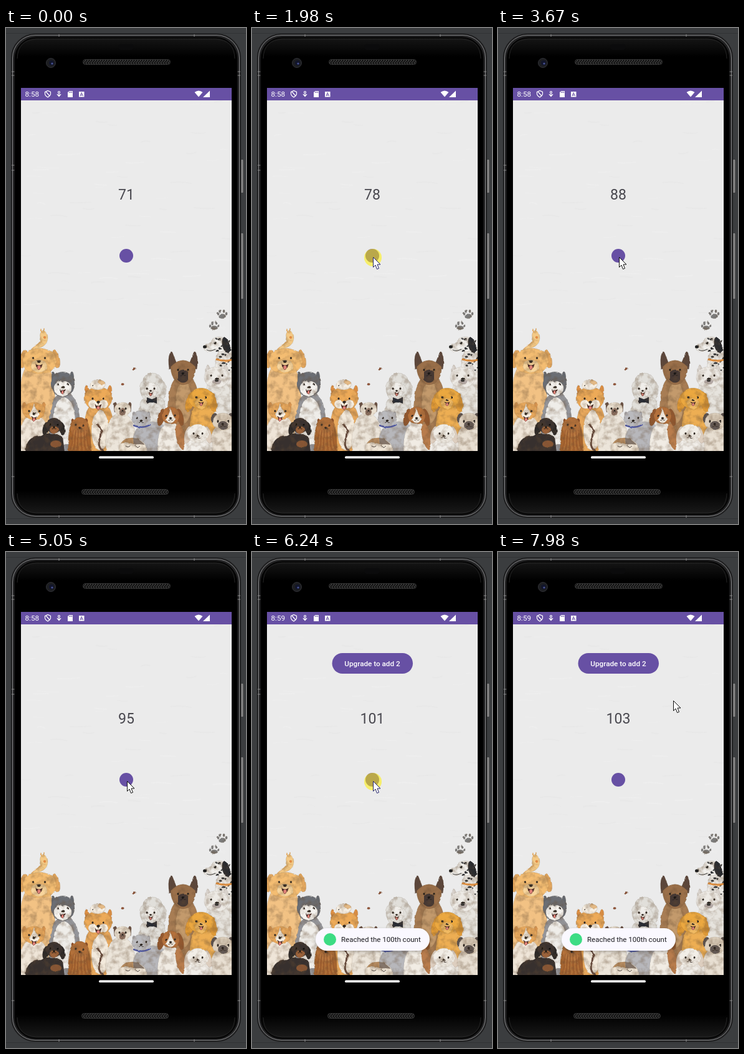
These frames come from a looping animation (385x795 px, 8 s). An HTML page:

```html
<!DOCTYPE html>
<html lang="en">
<head>
<meta charset="utf-8">
<title>Tap counter</title>
<style>
html, body { margin: 0; width: 100%; height: 100%; overflow: hidden; background: #3b3d3f; }
svg { display: block; width: 385px; height: 795px; font-family: Roboto, sans-serif; }
text { white-space: pre; }
</style>
</head>
<body>
<svg viewBox="0 0 385 795" xmlns="http://www.w3.org/2000/svg">
  <defs>
    <linearGradient id="glass" x2="0" y2="1">
      <stop offset="0" stop-color="#161616"/><stop offset=".04" stop-color="#000"/>
      <stop offset=".95" stop-color="#000"/><stop offset="1" stop-color="#1a1a1a"/>
    </linearGradient>
    <linearGradient id="key" x2="1"><stop stop-color="#444"/><stop offset=".5" stop-color="#999"/><stop offset="1" stop-color="#4a4a4a"/></linearGradient>
    <pattern id="mesh" width="4" height="8" patternUnits="userSpaceOnUse">
      <rect width="4" height="8" fill="#171717"/><path d="M0 0L4 4L0 8" fill="none" stroke="#484848"/>
    </pattern>
    <clipPath id="screen"><rect x="24" y="96" width="338" height="582"/></clipPath>
    <filter id="soft" x="-20%" y="-40%" width="140%" height="200%"><feGaussianBlur stdDeviation="2.5"/></filter>
    <!-- ragged fur edges and mottled watercolour tone -->
    <filter id="wash" filterUnits="userSpaceOnUse" x="20" y="445" width="346" height="240" color-interpolation-filters="sRGB">
      <feTurbulence type="fractalNoise" baseFrequency=".1" numOctaves="3" seed="4" result="noise"/>
      <feDisplacementMap in="SourceGraphic" in2="noise" scale="3" xChannelSelector="R" yChannelSelector="G" result="rough"/>
      <feColorMatrix in="noise" values="0 0 0 0 .4  0 0 0 0 .3  0 0 0 0 .2  0 .9 0 0 -.37"/>
      <feComposite operator="in" in2="rough" result="tone"/>
      <feMerge><feMergeNode in="rough"/><feMergeNode in="tone"/></feMerge>
    </filter>
  </defs>

  <rect width="385" height="795" fill="#3b3d3f"/>
  <path d="M0 8.5H385M0 786.5H385" stroke="#303234"/>
  <rect x="376.500" y="211" width="4.500" height="53" rx="1.5" fill="url(#key)"/>
  <rect x="376.500" y="329" width="4.500" height="105" rx="1.5" fill="url(#key)"/>
  <rect x="8.500" y="9.500" width="368" height="775" rx="38" fill="#232324" stroke="#1a1a1b"/>
  <rect x="10.500" y="11.500" width="364" height="771" rx="36.500" fill="none" stroke="#868789"/>
  <path d="M9 70H14M9 76H14M9 220H14M9 228H14M9 719H14M371 70H376M371 76H376M371 719H376M85 10V14M302 10V14M85 781V785M302 781V785" stroke="#8b8b8b"/>
  <rect x="14.500" y="15.500" width="356" height="764" rx="34" fill="url(#glass)" stroke="#050505" stroke-width="2"/>
  <path d="M18 49Q19 19 49 18H336Q366 19 367 49M18 746Q19 776 49 777H336Q366 776 367 746" fill="none" stroke="#242424"/>
  <rect x="180" y="26" width="25" height="9" rx="4.5" fill="#0b0b0c"/>
  <rect x="123.500" y="50.500" width="140" height="8" rx="4" fill="url(#mesh)" stroke="#343434"/>
  <rect x="121.500" y="739.500" width="139" height="8" rx="4" fill="url(#mesh)" stroke="#343434"/>
  <circle cx="72" cy="56" r="7.500" fill="#1d1e21" stroke="#303136"/>
  <circle cx="73" cy="56" r="4" fill="#12152a"/><circle cx="74" cy="57" r="1.600" fill="#4a5596"/>

  <g clip-path="url(#screen)">
    <rect x="24" y="96" width="338" height="582" fill="#ebebeb"/>
    <g id="paper" stroke-linecap="round"></g>
    <g id="pets" filter="url(#wash)" stroke="#5a4632" stroke-opacity=".16" stroke-width=".8"></g>
    <rect x="24" y="96" width="338" height="20" fill="#6750a4"/>
    <text id="clock" x="30.500" y="110" font-size="11.7" fill="#fff"></text>
    <g fill="none" stroke="#fff" stroke-width="1.2">
      <path d="M62.500 102.500L67 100.500L71.500 102.500V106Q71 109 67 111Q63 109 62.500 106ZM64 102L70 109"/>
      <circle cx="85" cy="103" r="1.5"/><path d="M82 106L85 109.500L88 106M85 105V110"/>
    </g>
    <g fill="#fff">
      <path d="M99 103L101.500 101H107V111H99Z"/><rect x="117" y="102" width="8.500" height="8.500"/>
      <path d="M302.500 103Q309 98 315.500 103L309 110.500Z"/><path d="M316 111L327 100.500V111Z"/>
    </g>
    <path d="M101.500 102V104M103.500 102V104M105.500 102V104M119 109L121.200 103.500L123.500 109M120 107.500H122.500" fill="none" stroke="#6750a4"/>

    <g id="button">
      <rect x="128.500" y="162" width="129.500" height="33" rx="16.500" fill="#6750a4"/>
      <text x="193" y="183" font-size="11.7" font-weight="500" fill="#fff" text-anchor="middle">Upgrade to add 2</text>
    </g>
    <text id="count" x="193" y="274.500" font-size="23" fill="#49484f" text-anchor="middle"></text>
    <circle cx="193" cy="365" r="11" fill="#6750a4"/>
    <g id="toast">
      <rect x="102" y="605" width="183" height="36" rx="18" fill="#000" opacity=".25" filter="url(#soft)"/>
      <rect x="102" y="603" width="183" height="36" rx="18" fill="#faf8ff"/>
      <circle cx="125" cy="621" r="10" fill="#3ddc84"/>
      <text x="143" y="625" font-size="11.5" fill="#1c1b20">Reached the 100th count</text>
    </g>
  </g>
  <rect x="149" y="686.300" width="88" height="3.700" rx="1.850" fill="#f2f2f2"/>

  <g id="cursor">
    <circle id="press" r="14" cy="1" fill="#fff000" opacity=".55"/>
    <path id="arrow" d="M.5 .5V16.500L4 13L6.500 19.500L9.500 18.300L7 12H12Z" fill="#fff" stroke-linejoin="round"/>
  </g>
</svg>
<script>
const $ = id => document.getElementById(id);
const LOOP = 8000;

function paintPaper() {
  let seed = 7;
  const rnd = () => (seed = seed * 16807 % 2147483647) / 2147483647;
  let out = '';
  for (let i = 0; i < 75; i++) {
    const x = 24 + rnd() * 338, y = 118 + rnd() * 400, w = 8 + rnd() * 28;
    out += `<path d="M${x} ${y}q${w / 2} ${rnd() * 6 - 3} ${w} ${rnd() * 4 - 2}" fill="none" stroke="${rnd() < .6 ? '#f0f0f0' : '#e6e6e6'}" stroke-width="${.6 + rnd() * 1.6}" opacity=".6"/>`;
  }
  $('paper').innerHTML = out;
}

function paintPets() {
  let out = '';
  const oval = (x, y, rx, ry, fill, turn = 0) =>
    out += `<ellipse cx="${x}" cy="${y}" rx="${rx}" ry="${ry}" fill="${fill}" transform="rotate(${turn} ${x} ${y})"/>`;
  const shape = (d, fill) => out += `<path d="${d}" fill="${fill}"/>`;
  const line = (d, color, width = 1) =>
    out += `<path d="${d}" fill="none" stroke="${color}" stroke-opacity="1" stroke-width="${width}" stroke-linecap="round"/>`;
  const body = (x, top, w, bottom, fill) =>
    shape(`M${x - w / 2} ${bottom}C${x - w * .55} ${top + 15} ${x - w * .35} ${top} ${x} ${top}S${x + w * .55} ${top + 15} ${x + w / 2} ${bottom}Z`, fill);
  const ears = (x, y, gap, h, fill, w = 7) => [-1, 1].forEach(s =>
    shape(`M${x + s * (gap - w)} ${y + 3}L${x + s * (gap - 1)} ${y - h + 2}Q${x + s * (gap + 1)} ${y - h - 1} ${x + s * (gap + 3)} ${y - h + 3}Q${x + s * (gap + w * .7)} ${y - h / 2} ${x + s * (gap + w * .4)} ${y + 8}Z`, fill));
  const flops = (x, y, gap, rx, ry, fill) => [-1, 1].forEach(s => oval(x + s * gap, y, rx, ry, fill, s * -14));
  const face = (x, y, gap, tongue, dark = '#29231f') => {
    oval(x - gap, y, 1.5, 1.7, dark);
    oval(x + gap, y, 1.5, 1.7, dark);
    oval(x, y + gap * .6, gap * .3, gap * .22, dark);
    if (tongue) {
      shape(`M${x - gap * .6} ${y + gap}Q${x} ${y + gap * 1.4} ${x + gap * .6} ${y + gap}Q${x} ${y + gap * 3} ${x - gap * .6} ${y + gap}Z`, '#4a2925');
      oval(x, y + gap * 1.6, gap * .27, gap * .36, '#e5847b');
    } else line(`M${x - gap * .5} ${y + gap * 1.1}Q${x - 1} ${y + gap * 1.3} ${x} ${y + gap * .7}Q${x + 1} ${y + gap * 1.3} ${x + gap * .5} ${y + gap * 1.1}`, dark, .8);
  };
  const paw = (x, y) => {
    oval(x, y + 3, 5.5, 3.8, '#7c7c7c');
    [[-6.5, -1], [-3, -5], [2.5, -5], [6.5, -1]].forEach(([dx, dy]) => oval(x + dx, y + dy, 1.7, 2.4, '#7c7c7c'));
  };

  paw(347, 459);
  paw(334, 478);
  oval(205, 547, 2.5, 1.7, '#935338');
  oval(187, 571, 2.5, 1.7, '#935338');

  // golden retriever and bird
  body(50, 535, 58, 650, '#f2c284');
  flops(54, 530, 26, 6, 15, '#e2a75f');
  shape('M27 532C27 507 80 507 80 532C81 550 68 554 54 554S27 550 27 532Z', '#f4bd72');
  oval(53, 542, 13, 10, '#f8d59c');
  face(53, 529, 9.5, true);
  shape('M40 515Q55 508 55 496Q53 488 60 484Q67 486 67 497Q66 514 40 515Z', '#f4c985');
  line('M42 514L57 502M58 488L55 483M61 487L61 482', '#e3aa62', 1.5);
  oval(62, 495, 2, 2, '#e88b42');

  // husky
  body(94, 585, 50, 680, '#94959a');
  oval(93, 630, 18, 38, '#efede9');
  ears(91, 562, 14, 12, '#64676d');
  oval(91, 571, 19, 20, '#6b6e74');
  shape('M91 568Q98 562 105 574Q107 587 91 591Q75 587 77 574Q84 562 91 568Z', '#f5f3ef');
  face(91, 571, 8, true);

  // shiba and hamster
  body(149, 600, 49, 680, '#e8a85c');
  oval(151, 645, 14, 32, '#f3eadc');
  ears(148, 585, 18, 13, '#df9145');
  oval(148, 594, 22, 19, '#edaa58');
  flops(148, 603, 8, 8, 7, '#fbf3e6');
  face(148, 594, 9, true);
  oval(147, 572, 13, 8, '#f6eee2');
  oval(153, 568, 6, 3, '#e4ba86', 15);
  oval(139, 573, 1, 1, '#333');

  // poodle
  body(235, 592, 48, 640, '#e4e2dd');
  [[224, 579, 9, 15], [249, 580, 8, 15], [235, 565, 15, 12], [235, 583, 14, 14], [224, 604, 9, 11], [246, 603, 9, 11]]
    .forEach(([x, y, rx, ry]) => oval(x, y, rx, ry, '#e1dfda'));
  oval(233, 580, 10, 12, '#f0eeea');
  face(232, 578, 6, true);
  shape('M226 592L234 595L242 592V602L234 599L226 602Z', '#282b33');

  // shepherd
  body(285, 557, 52, 660, '#a87d54');
  oval(285, 600, 13, 34, '#c39a6c');
  ears(284, 540, 18, 22, '#5b463b', 10);
  shape('M264 543Q284 522 304 543Q305 558 295 568Q284 576 273 568Q264 557 264 543Z', '#9b704a');
  shape('M276 551Q284 544 292 551L292 565Q284 572 276 565Z', '#443733');
  face(284, 548, 8, false, '#171514');

  // dalmatian
  body(354, 510, 38, 580, '#ece9e4');
  oval(342, 507, 14, 12, '#f1efeb');
  oval(328, 512, 11, 6.5, '#f1efeb', -6);
  oval(353, 508, 6, 13, '#292b2f', -12);
  oval(319, 511, 3, 2.5, '#1e2022');
  oval(336, 505, 1.7, 2, '#222');
  line('M322 516Q329 519 335 515', '#333');
  for (let i = 0; i < 24; i++) oval(338 + i * 37 % 25, 498 + i * 53 % 60, 1.5 + i % 2, 1.6, '#303236');
  line('M338 531Q350 535 362 532', '#df8f40', 3);

  // bulldog
  body(340, 564, 48, 640, '#e6e3dd');
  ears(338, 551, 14, 12, '#d8d2cc', 8);
  oval(338, 560, 20, 17, '#eeebe6');
  face(338, 557, 9, false);
  oval(338, 567, 7, 4, '#b7adab');
  oval(338, 565, 3, 2, '#333');

  // spaniel
  body(316, 600, 42, 660, '#edae53');
  flops(313, 599, 18, 6.5, 17, '#e09a36');
  oval(313, 594, 20, 17, '#eba840');
  oval(313, 602, 10, 9, '#f0b962');
  face(313, 592, 7, true);

  // corgi
  body(45, 620, 46, 678, '#efe5d8');
  ears(45, 610, 15, 11, '#dc9852');
  oval(45, 614, 18, 14, '#e8a85c');
  shape('M45 601Q47 612 53 619Q45 633 37 619Q43 612 45 601Z', '#fbf4e8');
  face(45, 614, 8, true);

  // siamese cat
  line('M146 636Q157 644 151 657T157 680', '#65493c', 3);
  body(184, 618, 47, 680, '#ece5da');
  ears(187, 608, 11, 9, '#6a5247', 5);
  oval(187, 611, 13, 11, '#ebe1d2');
  oval(187, 615, 5, 6, '#8c7061');
  face(187, 610, 5, false);

  // grey cat
  body(234, 631, 62, 682, '#b7b7bb');
  ears(217, 621, 11, 7, '#a9a9af', 5);
  oval(217, 626, 15, 13, '#bababe');
  face(217, 625, 7, false);
  line('M205 637Q218 643 231 636', '#5059a2', 2.5);

  // beagle
  body(265, 633, 43, 682, '#f1ece4');
  oval(280, 655, 7, 21, '#b87c4c', -12);
  flops(264, 624, 15, 5.5, 14, '#93582f');
  oval(264, 621, 14, 14, '#b5713c');
  shape('M264 608Q266 620 272 627Q264 640 256 627Q262 620 264 608Z', '#f9f3e9');
  face(264, 621, 7, false);

  // dachshund
  shape('M31 680Q32 654 55 654Q70 645 91 655L94 680Z', '#37302e');
  flops(77, 642, 13, 5, 11, '#2b2827');
  oval(77, 637, 13, 12, '#39312f');
  oval(77, 644, 7, 6, '#9c623a');
  face(77, 636, 6, false, '#0d0d0d');
  oval(80, 667, 9, 6, '#8a5735');

  // terrier
  body(118, 624, 36, 680, '#a5642f');
  ears(118, 632, 10, 7, '#8c4c27', 5);
  oval(118, 640, 15, 16, '#b4713a');
  for (let i = -5; i < 6; i++) line(`M${118 + i * 2} 645Q${118 + i * 2.5} 660 ${118 + i * 3} 676`, i % 2 ? '#945630' : '#bd8048', .8);
  face(118, 637, 6, false);

  // calico cat
  oval(203, 675, 22, 18, '#eee4d5');
  shape('M184 666Q190 656 204 657L205 668Q192 663 184 666Z', '#ba8f63');
  shape('M204 657Q217 658 222 668Q213 666 205 668Z', '#84756a');
  line('M192 670Q196 673 199 670M207 670Q211 673 214 670', '#443a34');

  // pug
  body(350, 636, 46, 682, '#e8dfd2');
  flops(348, 625, 14, 5, 8, '#5a5250');
  oval(348, 631, 16, 14, '#ddd0be');
  oval(348, 637, 8, 7, '#635955');
  face(348, 630, 8, false);

  // lop-eared puppy
  body(308, 642, 45, 682, '#f1eee9');
  flops(308, 652, 16, 5.5, 14, '#ddcebf');
  oval(308, 650, 17, 15, '#f2eee7');
  face(308, 650, 7, false);

  $('pets').innerHTML = out;
}

// [time, counter value]; single taps are spaced evenly between entries
const taps = [[950, 72], [1890, 78], [3640, 88], [5050, 95], [5900, 100], [6440, 103]];
const tapTimes = taps.flatMap(([time, n], i) => {
  if (!i) return [time];
  const [t0, n0] = taps[i - 1];
  return Array.from({ length: n - n0 }, (_, k) => t0 + (time - t0) * (k + 1) / (n - n0));
});

// [time, x, y]
const route = [
  [50, 324, 790], [180, 309, 738], [380, 248, 549], [570, 207, 405], [720, 194, 367],
  [6800, 194, 367], [6920, 198, 347], [7020, 203, 319], [7120, 207, 246], [7190, 181, 206],
  [7270, 111, 224], [7350, 51, 326], [7430, 48, 480], [7510, 75, 604], [7580, 124, 645],
  [7610, 124, 645], [7690, 215, 655], [7770, 333, 590], [7830, 374, 468], [7900, 345, 324], [7980, 281, 238]
];

function locate(t) {
  const i = route.findIndex(p => p[0] > t);
  if (i < 0) return route.at(-1).slice(1);
  if (!i) return route[0].slice(1);
  const a = route[i - 1], b = route[i], k = (t - a[0]) / (b[0] - a[0]);
  return [a[1] + (b[1] - a[1]) * k, a[2] + (b[2] - a[2]) * k];
}

function render(t) {
  $('count').textContent = 71 + tapTimes.filter(time => time <= t).length;
  $('clock').textContent = t < 5400 ? '8:58' : '8:59';
  $('button').style.display = t < 5900 ? 'none' : '';

  const rise = Math.min(1, Math.max(0, (t - 5880) / 230));
  const scale = .92 + .08 * rise;
  $('toast').setAttribute('opacity', rise);
  $('toast').setAttribute('transform', `translate(193.5 621) scale(${scale}) translate(-193.5 -621)`);

  const pressed = tapTimes.some(time => t >= time - 85 && t < time);
  const [x, y] = locate(t);
  $('cursor').style.display = t < 50 ? 'none' : '';
  $('cursor').setAttribute('transform', `translate(${x} ${y})`);
  $('press').style.display = pressed ? '' : 'none';
  $('arrow').setAttribute('stroke', pressed ? '#25256b' : '#111');
}

paintPaper();
paintPets();
const start = performance.now();
(function tick() {
  render((performance.now() - start) % LOOP);
  requestAnimationFrame(tick);
})();
</script>
</body>
</html>
```
